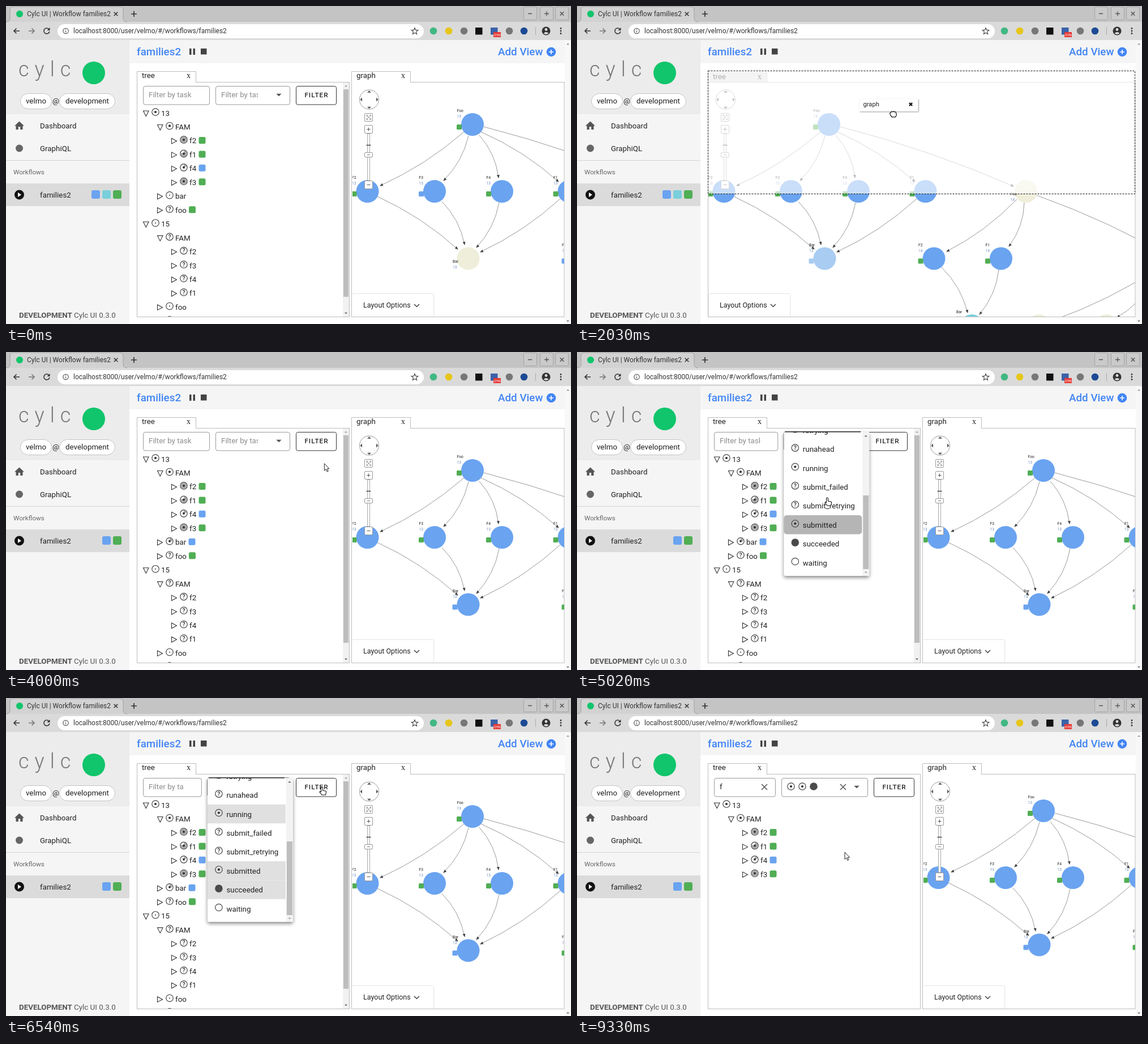
An HTML page for the animation above (9360 ms loop, 998 by 561 pixels).

```html
<!DOCTYPE html>
<html lang="en">
<head>
<meta charset="utf-8">
<title>Workflow UI</title>
<style>
html, body { margin: 0; width: 100%; height: 100%; overflow: hidden; background: #fff; }
svg { display: block; width: 100%; height: 100%; font: 13.35px Roboto, sans-serif; }
text { white-space: pre; }
</style>
</head>
<body>
<svg viewBox="0 0 998 561">
  <defs>
    <marker id="arrow" viewBox="0 0 6 6" refX="5" refY="3" markerWidth="6" markerHeight="6" orient="auto">
      <path d="M0 .5L6 3L0 5.5z" fill="#444"/>
    </marker>
    <clipPath id="treeClip"><rect x="232" y="135" width="374" height="413"/></clipPath>
    <clipPath id="menuClip"><rect x="340" y="141" width="190" height="254"/></clipPath>
  </defs>
  <g id="chrome"></g>
  <g id="stage"></g>
</svg>
<script>
const LOOP = 9360;
const BLUE = '#6aa3f0', GREEN = '#50ae54', TEAL = '#79cfda', BEIGE = '#eeeeda', PALE = '#a9ccf2';
const INK = '#222', LINE = '#bdbdbd';

// Drawing helpers
const rect = (x, y, w, h, fill, more = '') => `<rect x="${x}" y="${y}" width="${w}" height="${h}" fill="${fill}" ${more}/>`;
const box = (x, y, w, h, stroke = LINE, fill = '#fff', more = '') =>
  rect(x + .5, y + .5, w - 1, h - 1, fill, `stroke="${stroke}" ${more}`);
const circle = (x, y, r, fill, more = '') => `<circle cx="${x}" cy="${y}" r="${r}" fill="${fill}" ${more}/>`;
const path = (d, stroke, width = 1, fill = 'none', more = '') =>
  `<path d="${d}" stroke="${stroke}" stroke-width="${width}" fill="${fill}" ${more}/>`;
const solid = (d, fill = INK) => path(d, 'none', 0, fill);
const text = (x, y, s, fill = INK, size = 13.35, more = '') =>
  `<text x="${x}" y="${y}" fill="${fill}" font-size="${size}" ${more}>${s}</text>`;
const group = (s, attrs) => `<g ${attrs}>${s}</g>`;
const cross = (x, y, r, color = '#555', width = 1.5) =>
  path(`M${x - r} ${y - r}l${2 * r} ${2 * r}m0 ${-2 * r}l${-2 * r} ${2 * r}`, color, width);
const downArrow = (x, y, r, color = '#555') => solid(`M${x - r} ${y - r / 2}h${2 * r}l${-r} ${r}z`, color);
const upArrow = (x, y, r, color = '#555') => solid(`M${x - r} ${y + r / 2}h${2 * r}l${-r} ${-r}z`, color);
const MIDDLE = 'text-anchor="middle"';

function browser() {
  const buttons = [914, 943, 970].map(x => box(x, 1, 24, 24, '#a4a4a4', '#cacaca', 'rx="2"')).join('');
  const badges = [[755, '#41b883'], [782, '#e6c619'], [809, '#777'], [889, '#777'], [915, '#1c4a94']]
    .map(([x, color]) => circle(x, 44, 6.3, color)).join('');
  return rect(0, 0, 998, 28, '#c4c4c4') + rect(0, 28, 998, 32, '#dadada') +
    path('M0 28q7 0 7-7V7q0-6 6-6H201q6 0 6 6V21q0 7 7 7', '#a0a0a0', 1, '#d2d2d2') +
    circle(24, 14, 6, '#10c56b') + text(37, 18, 'Cylc UI | Workflow families2', '#333', 12) +
    cross(194, 14, 3.3, '#333') + path('M226 9v10M221 14h10', '#333', 1.7) +
    buttons + path('M922 13.5h7M955 9.5v8M951 13.5h8', '#555', 1.3) + cross(982, 13.5, 3.2) +
    path('M24 44H14m4.5-4.5L14 44l4.5 4.5', '#333', 1.6) +
    path('M40 44h10m-4.500-4.500L50 44l-4.500 4.500', '#777', 1.6) +
    path('M75.500 40.500a5 5 0 1 0 1.300 4.500', '#333', 1.6) + solid('M77.500 38v5h-5z', '#333') +
    rect(91, 32, 647, 25, '#fff', 'rx="12.5"') +
    circle(105.5, 44, 4.7, 'none', 'stroke="#555" stroke-width="1.2"') +
    path('M105.5 43.500v3M105.500 41v1.200', '#555', 1.2) +
    text(119, 48, 'localhost:8000/user/velmo/#/workflows/families2', '#333', 12) +
    path('M722 38.500l1.600 3.900 4.200.300-3.200 2.700 1 4.100-3.600-2.200-3.600 2.200 1-4.100-3.200-2.700 4.200-.300z', '#444', 1.1) +
    badges + rect(829, 38, 12.500, 12.500, '#111') + rect(856, 38, 12.500, 12.500, '#3b62a8') +
    rect(861, 46, 13, 9, '#e53935') + text(867.5, 53, 'CHN', '#fff', 5.5, MIDDLE) +
    rect(935, 37, 1, 14, '#aaa') + circle(954, 44, 7.500, '#333') + circle(954, 41.5, 2.4, '#dadada') +
    solid('M949.500 48q4.500-4 9 0q-4.500 4-9 0z', '#dadada') +
    [39.5, 44, 48.5].map(y => circle(980, y, 1.4, '#333')).join('');
}

function sidebar() {
  const pill = (x, w, s) => box(x, 154, w, 28, '#c4c4c4', '#fff', 'rx="14"') + text(x + w / 2, 172, s, INK, 13.35, MIDDLE);
  return rect(0, 60, 218, 501, '#f5f5f5') + rect(0, 60, 218, 131, '#ececec') +
    text(22, 124, 'cylc', '#777', 36, 'letter-spacing="10" font-weight="300"') + circle(155, 118, 20, '#10c56b') +
    pill(25, 56, 'velmo') + text(82, 172, '@') + pill(94, 99, 'development') +
    solid('M15 211.500l8.500-8 8.500 8h-2.500v6.500h-4.300v-5h-3.400v5h-4.300v-6.500z', '#555') +
    text(60, 215.500, 'Dashboard') + circle(23.500, 251, 6.500, '#666') + text(60, 256, 'GraphiQL') +
    rect(0, 272, 218, 1, '#d4d4d4') + text(13, 297, 'Workflows', '#666', 11.7) +
    rect(0, 313, 218, 40, '#dbdbdb') + circle(23.5, 333, 8.500, '#111') + solid('M21 329v8l6-4z', '#fff') +
    text(60, 338, 'families2') +
    text(23, 550, '<tspan font-weight="700">DEVELOPMENT</tspan> Cylc UI 0.3.0', '#555');
}

function header() {
  const title = 'font-weight="500"';
  return rect(218, 60, 769, 41, '#f5f5f5') + text(231, 87, 'families2', '#4285f4', 18.8, title) +
    solid('M324 75h3.500v11h-3.500zM330.500 75h3.500v11h-3.500zM344 75h10.500v10.500h-10.500z', '#444') +
    text(869, 87, 'Add View', '#4285f4', 18.8, title) + circle(963, 81, 8.300, '#4285f4') +
    path('M963 77v8M959 81h8', '#fff', 1.6) +
    rect(987, 60, 11, 501, '#f8f8f8') + upArrow(992.5, 67, 2.5, '#888') + downArrow(992.5, 556, 2.5, '#666');
}

// Task icons: 'dot', 'tiny', '?', 'full', 'empty' or a progress share from 0 to 1
function taskIcon(x, y, kind) {
  const ring = fill => circle(x, y, 6.2, fill, 'stroke="#444" stroke-width="1.2"');
  if (kind === '?') return ring('none') + text(x, y + 3.8, '?', '#333', 10.5, MIDDLE + ' font-weight="500"');
  if (kind === 'full') return circle(x, y, 6.8, '#4a4a4a');
  if (kind === 'empty') return ring('none');
  if (kind === 'tiny') return ring('none') + circle(x, y, 1, '#333');
  if (kind === 'dot') return ring('none') + circle(x, y, 2.1, '#333');
  const a = kind * 2 * Math.PI;
  const pie = kind < 1
    ? solid(`M${x} ${y}V${y - 5.5}A5.500 5.500 0 ${kind > .5 ? 1 : 0} 1 ${x + 5.5 * Math.sin(a)} ${y - 5.5 * Math.cos(a)}z`, '#aaa')
    : circle(x, y, 5.5, '#aaa');
  return ring('none') + pie + circle(x, y, 2, '#333');
}

function tree(s) {
  const members = [['f2', 1, GREEN], ['f1', .8, GREEN], ['f4', .2, BLUE], ['f3', 1, GREEN]];
  const rows = [[0, '13', 'dot'], [1, 'FAM', 'dot'], ...members.map(([n, icon, job]) => [2, n, icon, job])];
  if (!s.named) rows.push(s.barRuns ? [1, 'bar', .25, BLUE] : [1, 'bar', 'tiny']);
  if (!s.filtered) {
    rows.push([1, 'foo', '?', GREEN], [0, '15', 'tiny'], [1, 'FAM', '?']);
    for (const name of ['f2', 'f3', 'f4', 'f1']) rows.push([2, name, '?']);
    rows.push([1, 'foo', 'tiny'], [1, 'bar', '?']);
  }
  const body = rows.map(([depth, name, icon, job], i) => {
    const x = 242 + 25 * depth, y = 188.5 + 24.46 * i;
    const open = depth === 0 || name === 'FAM';
    const marker = open ? `M${x + .5} ${y - 3.500}h9.500l-4.750 9.500z` : `M${x + .5} ${y - 4}v9.500l9-4.750z`;
    const jobX = { bar: 322.5, foo: 323 }[name] || 340.5;
    return path(marker, '#333', 1.1) + taskIcon(x + 22, y - 1.5, icon) + text(x + 32, y + 5, name) +
      (job ? rect(jobX, y - 6.5, 12, 12, job, 'rx="2.5"') : '');
  }).join('');
  const scrollbar = s.filtered ? '' : rect(595, 135, 11, 413, '#f1f1f1') + rect(596, 147, 9, 366, '#bdbdbd') +
    upArrow(600.5, 141, 2.5, '#999') + downArrow(600.5, 542, 2.5);
  return group(body + filters(s) + scrollbar, 'clip-path="url(#treeClip)"');
}

function clippedText(x, y, s, right) {
  return `<svg x="${x}" y="${y - 14}" width="${right - x}" height="20">${text(0, 14, s, '#8c8c8c')}</svg>`;
}

function filters(s) {
  const left = s.filtered ? 361 : 370 - 4.7 * s.picks.length;
  const right = s.filtered ? 514 : 502;
  const fieldRight = left - 10;
  const border = on => on ? 'rx="3.5" stroke-width="2"' : 'rx="3.5"';
  const outline = on => on ? INK : '#999';
  const field = box(242, 141, fieldRight - 242, 33.5, outline(s.focus), '#fff', border(s.focus)) +
    (s.typed ? text(252, 161, 'f') + cross(331, 157, 5) : clippedText(252, 161, 'Filter by task', fieldRight - 32)) +
    (s.focus && !s.typed ? rect(252, 150, 1, 15, '#555') : '');
  const chips = s.picks.length
    ? ['dot', 'dot', 'full'].slice(0, s.picks.length).map((icon, i) => taskIcon(left + 17 + 20 * i, 156, icon)).join('') + cross(right - 44, 157, 5)
    : clippedText(left + 10, 161, 'Filter by task state', right - 57);
  return field + box(left, 141, right - left, 33.5, outline(s.menu), '#fff', border(s.menu)) + chips +
    downArrow(right - 20, 157, 4.7) + box(right + 10, 141, 72, 33.5, '#333', '#fff', 'rx="3"') +
    text(right + 46.5, 161, 'FILTER', INK, 11.7, MIDDLE + ' font-weight="500" letter-spacing="1.05"');
}

const STATES = [['expired', '?'], ['failed', '?'], ['held', '?'], ['queued', '?'], ['ready', '?'], ['retrying', '?'],
  ['runahead', '?'], ['running', 'dot'], ['submit_failed', '?'], ['submit_retrying', '?'],
  ['submitted', 'dot'], ['succeeded', 'full'], ['waiting', 'empty']];

function menu(s) {
  const x = 370 - 4.7 * s.picks.length;
  const items = STATES.map(([name, icon], i) => {
    const y = 165.7 + 33.4 * i - s.scroll;
    const shade = s.ripple === name ? '#b5b5b5' : '#e0e0e0';
    return (s.picks.includes(name) ? rect(x, y - 16.7, 138, 33.4, shade, s.ripple === name ? 'rx="5"' : '') : '') +
      taskIcon(x + 20, y - 2, icon) + text(x + 33.5, y + 5, name);
  }).join('');
  const bar = rect(x + 139, 141, 12, 254, '#f3f3f3') + rect(x + 140, 153 + s.scroll * 100 / 195, 10, 130, '#bdbdbd') +
    upArrow(x + 145, 148, 2.5) + downArrow(x + 145, 389, 2.5, '#999');
  return rect(x, 141, 151, 254, '#fff', 'rx="3" style="filter:drop-shadow(0 3px 3px #0007)"') +
    group(items + bar, 'clip-path="url(#menuClip)"') + rect(x + 2, 140, 134, 1.500, INK);
}

// Directed edges bow to the right while they run downwards
function edge([x1, y1, x2, y2]) {
  const dx = x2 - x1, dy = y2 - y1, k = 13 / Math.hypot(dx, dy);
  return path(`M${x1} ${y1}Q${(x1 + x2) / 2 + dy * k} ${(y1 + y2) / 2 - dx * k} ${x2} ${y2}`, '#999', 1, 'none', 'marker-end="url(#arrow)"');
}
const EDGES = [[809, 222, 661, 317], [817, 229, 773, 308], [836, 228, 870, 303], [839, 222, 976, 310], [844, 213, 1150, 318],
  [656, 336, 798, 429], [770, 345, 810, 421], [871, 347, 831, 426], [979, 340, 838, 434],
  [1156, 341, 1032, 433], [1169, 347, 1142, 424], [1191, 334, 1440, 450],
  [1023, 461, 1069, 541], [1124, 465, 1090, 544], [1410, 460, 1219, 555], [1390, 490, 1333, 549]].map(edge).join('');

function node(x, y, name, cycle, color, job) {
  const labelY = job ? y - 22 : y + 7;
  return circle(x, y, 20, color) + text(x - 27.5, labelY, name, INK, 6.7) +
    text(x - 27.5, labelY + 10, cycle, '#6f8fc0', 6.7) + (job ? rect(x - 28, y, 9, 9, job, 'rx="1.5"') : '');
}

function graph(s) {
  const [barColor, barJob] = s.bar;
  const nodes = node(824, 209, 'Foo', 13, BLUE, GREEN) + node(638.5, 327, 'F2', 13, BLUE, GREEN) +
    node(757, 327, 'F3', 13, BLUE, s.early ? BLUE : GREEN) + node(876, 327, 'F4', 13, BLUE, GREEN) +
    node(994.5, 327, 'F1', 13, BLUE, GREEN) + node(816.5, 445.5, 'Bar', 13, barColor, barJob) +
    node(1172, 327, 'Foo', 14, BEIGE) + node(1009.5, 445.5, 'F2', 14, BLUE, s.early ? BLUE : GREEN) +
    node(1128, 445.5, 'F1', 14, BLUE, GREEN) + node(1076.5, 564, 'Bar', 14, s.barRuns ? BLUE : TEAL, BLUE) +
    node(1195, 564, 'Foo', 15, BEIGE) + node(1314, 564, 'F2', 15, BEIGE);
  const key = (y, h) => box(633, y, 15, h, '#999', '#fff', 'rx="1.5"');
  const panZoom = circle(641.5, 165, 17, '#fff', 'stroke="#999"') + upArrow(641.5, 151, 3.500) + downArrow(641.5, 179.500, 3.500) +
    solid('M629 161.500v7l-3.500-3.500zM654 161.500v7l3.500-3.500z', '#555') +
    (s.dots ? [631.500, 637.500, 643.500].map(x => rect(x - 1, 161, 2.500, 2, '#4a86d8')).join('') : '') +
    key(189, 15) + path('M637 195v-2.500h2.500M642 192.500h2.500V195M644.500 198v2.500H642M639.500 200.500H637V198M638 194l5 5m0-5l-5 5', '#777', .9) +
    key(210, 15) + path('M637.500 217.500h6M640.500 214.500v6', '#555') +
    box(638, 225, 5, 83, '#aaa') + path('M636.500 245.500h8', '#333', 1.3) +
    key(258, 9) + path('M638 262.500h5', '#777') + key(308, 15) + path('M637.500 315.500h6', '#555');
  const options = rect(612, 508, 143, 40, '#fff', 'style="filter:drop-shadow(0 0 1px #0004)"') +
    text(631, 532, 'Layout Options', INK, 12.5) + path('M721 526l4.500 4.500 4.500-4.500', '#444', 1.5);
  const x = s.merged ? 232 : 612;
  return `<svg x="${x}" y="135" width="${986 - x}" height="413" viewBox="${x} 135 ${986 - x} 413">` +
    group(group(EDGES + nodes, `transform="translate(0 ${s.lift})"`) + panZoom + options, `transform="translate(${s.merged ? -379 : 0} 0)"`) + '</svg>';
}

function tab(x, name, active = true) {
  const y = active ? 115 : 117;
  return rect(x, y, 104, active ? 20 : 18, active ? '#fff' : '#e2e2e2') +
    path(`M${x + .5} 134.500V${y + .5}h104V134.500${active ? '' : 'z'}`, LINE) +
    text(x + 9, y + 12, name) + text(x + 88, y + 12, 'x', INK, 14, 'font-family="Liberation Serif, serif"');
}

// Motion
const ease = p => { p = Math.min(1, Math.max(0, p)); return p * p * (3 - 2 * p); };
const mix = (a, b, p) => a + (b - a) * p;
const POINTER = [[200, 760, 190], [400, 658, 126], [850, 425, 160], [1020, 413.5, 129], [1170, 394, 128], [1270, 370, 127],
  [1630, 370, 127], [2180, 600, 205], [2480, 600, 205], [2780, 769, 266], [2980, 850, 290], [3140, 850, 290], [3790, 570, 200],
  [3950, 570, 200], [4250, 470, 158], [4500, 440, 250], [4820, 441, 302], [4920, 441, 302], [5020, 442, 257], [5250, 430, 206],
  [5350, 430, 206], [5650, 425, 338], [5870, 425, 338], [6500, 558, 157], [6780, 558, 157], [7250, 313, 160], [8050, 313, 160],
  [8450, 560, 158], [8780, 570, 155], [9330, 473, 272]];

function pointerAt(t) {
  const i = POINTER.findIndex(p => p[0] > t);
  if (i < 0) return POINTER[POINTER.length - 1].slice(1);
  const [t0, x0, y0] = POINTER[i - 1], [t1, x1, y1] = POINTER[i];
  const p = ease((t - t0) / (t1 - t0));
  return [mix(x0, x1, p), mix(y0, y1, p)];
}

const CURSORS = {
  arrow: path('M0 0V12.500l2.900-2.600 2 4.600 2-.900-2-4.400h3.700z', '#222', 1, '#fff'),
  hand: path('M-1.500 1q1.500-2 3 0v5l5 1q1.500.500 1 2.500l-1 4.500h-6.500l-4-5q0-2 2.500-.500z', '#111', 1.1, '#fff'),
  grab: path('M-5 1q-2-3 1-4q1-3 3-1q2-2 3 0q3-1 3 2q2 3-1 7h-6.500z', '#111', 1.2, '#fff'),
  beam: path('M-3-6q3 0 3 2v9q0 2-3 2M3-6q-3 0-3 2v9q0 2 3 2M-2 1h4', '#111', 1.2)
};

function cursorKind(t, dragging) {
  if (dragging) return 'grab';
  if (t > 4150 && t < 6850 || t > 8380 && t < 8850) return 'hand';
  return t > 7100 && t < 8150 ? 'beam' : 'arrow';
}

// The drop zone slides from the top half to the right half
function dropZone(t) {
  let x = 231, w = 375, h = 435;
  if (t > 1630) {
    const p = ease((t - 2695) / 130);
    x = mix(231, 608.5, p); w = 986 - x; h = mix(218, 435, p);
  }
  return box(x, 114, w, h, '#111', 'rgba(255,255,255,.64)', 'stroke-dasharray="3 2"');
}

function dragImage(x, y) {
  return rect(x - 60, y - 27, 104, 22, '#fff', 'style="filter:drop-shadow(1px 1px 1px #0006)"') +
    text(x - 53, y - 14, 'graph', INK, 11.2) + cross(x + 31, y - 17.5, 2.600, '#111', 2.3);
}

function stateAt(t) {
  const filtered = t >= 6740;
  const picks = [[4900, 'submitted'], [5300, 'running'], [5700, 'succeeded']].filter(p => t >= p[0]).map(p => p[1]);
  const barRuns = t >= 2480;
  return {
    picks, filtered, barRuns,
    early: t < 900,
    merged: t >= 900 && t < 3190,
    dragging: t >= 400 && t < 900 || t >= 1680 && t < 3190,
    bar: t < 900 ? [BEIGE] : barRuns ? [BLUE, BLUE] : [PALE, PALE],
    dots: t >= 50 && t < 400 || barRuns && t < 3190,
    menu: t >= 4250 && t < 6620,
    scroll: 195 * ease((t - 4450) / 250),
    ripple: t < 5200 ? 'submitted' : t >= 5300 && t < 5500 ? 'running' : t >= 5700 && t < 5950 ? 'succeeded' : '',
    lift: t >= 7000 ? -10 : 0,
    focus: t >= 7280 && t < 8500,
    typed: t >= 7900,
    named: t >= 8600
  };
}

function scene(t) {
  const s = stateAt(t);
  const badges = (t < 2330 ? [[151, BLUE], [170, TEAL], [189, GREEN]] : [[170, BLUE], [189, GREEN]])
    .map(([x, color]) => rect(x, 325, 15, 15, color, 'rx="3"')).join('');
  let out = badges;
  if (s.merged) {
    out += box(231, 134, 755.500, 415) + graph(s) + tab(231, 'tree', false) + (s.dragging ? '' : tab(335, 'graph'));
  } else {
    out += box(231, 134, 376, 415) + tree(s) + tab(231, 'tree') +
      box(610, 134, 376.500, 415) + graph(s) + (s.dragging ? '' : tab(610, 'graph'));
  }
  if (s.menu) out += menu(s);
  if (t >= 200) {
    const [x, y] = pointerAt(t);
    if (s.dragging) out += dropZone(t) + dragImage(x, y);
    out += group(CURSORS[cursorKind(t, s.dragging)], `transform="translate(${x} ${y})"`);
  }
  return out;
}

const stage = document.getElementById('stage');
document.getElementById('chrome').innerHTML = browser() + sidebar() + header();
const start = performance.now();
function frame() {
  stage.innerHTML = scene((performance.now() - start) % LOOP);
  requestAnimationFrame(frame);
}
frame();
</script>
</body>
</html>
```
